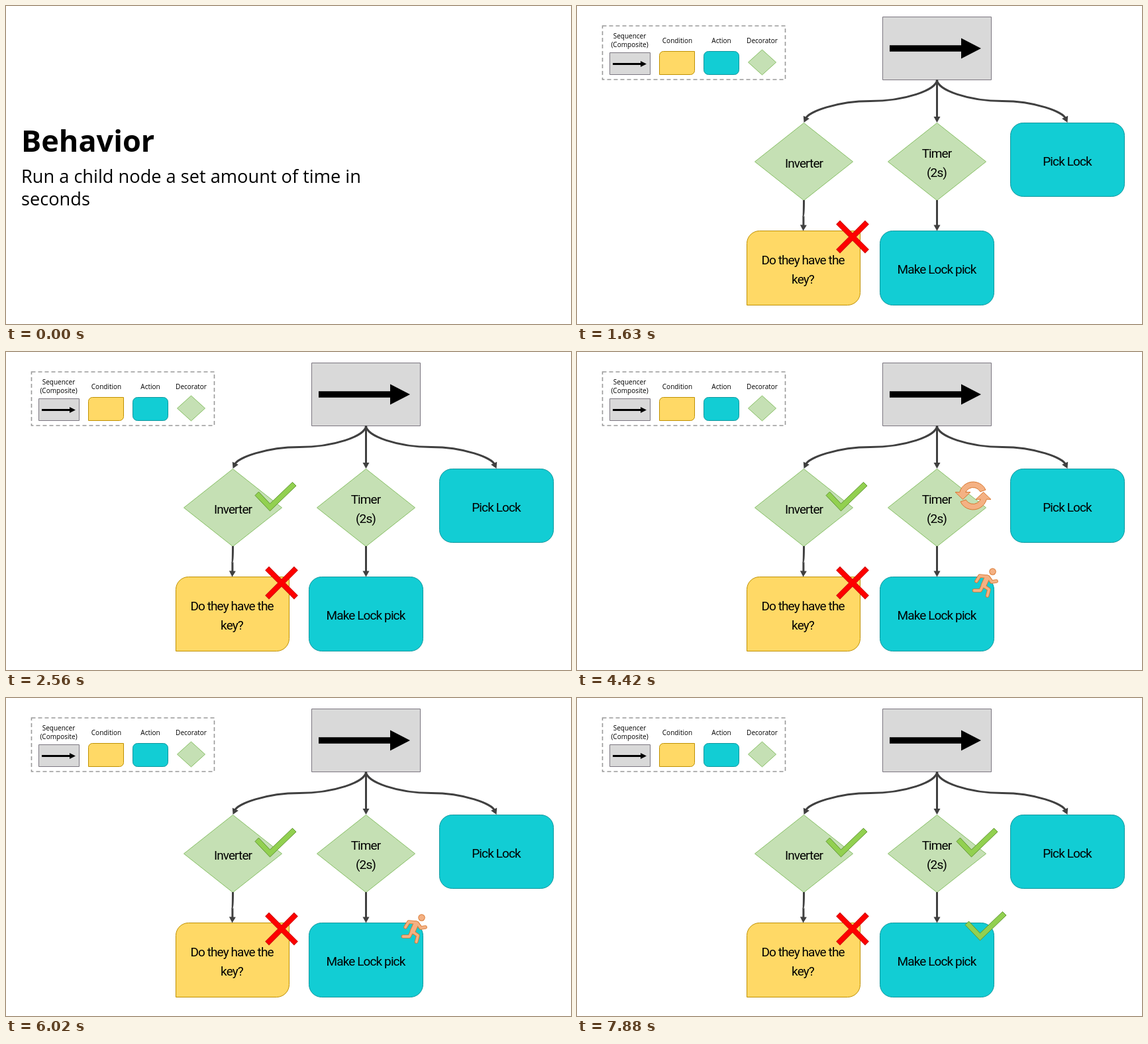
An HTML page with a canvas that plays this animation: 853 by 480 pixels, repeating every 8000 ms.

```html
<!DOCTYPE html>
<html lang="en">
<head>
<meta charset="utf-8">
<title>Timer decorator</title>
<style>
html, body { margin: 0; width: 100%; height: 100%; overflow: hidden; background: #fff; }
canvas { display: block; }
</style>
</head>
<body>
<canvas id="stage" width="853" height="480"></canvas>
<script>
const ctx = document.getElementById('stage').getContext('2d');
const LOOP = 8000;
const SANS = '"Open Sans", "Noto Sans", sans-serif';
const INK = '#404040';
const GREY = ['#d9d9d9', '#7b7680'];
const GOLD = ['#ffd966', '#bf9000'];
const TEAL = ['#12cdd4', '#0e979d'];
const LEAF = ['#c5e0b4', '#86bf63'];
const PEACH = ['#f4b183', '#d9772f'];

function paint([fill, line], width = 1) {
  ctx.fillStyle = fill;
  ctx.fill();
  ctx.strokeStyle = line;
  ctx.lineWidth = width;
  ctx.stroke();
}

function poly(points) {
  ctx.beginPath();
  points.forEach(([x, y]) => ctx.lineTo(x, y));
  ctx.closePath();
}

function box(x, y, w, h, radii, colors) {
  ctx.beginPath();
  ctx.roundRect(x, y, w, h, radii);
  paint(colors);
}

function diamond(x, y, rx, ry) {
  poly([[x, y - ry], [x + rx, y], [x, y + ry], [x - rx, y]]);
  paint(LEAF);
}

function text(str, x, y, font, align = 'center', spacing = '0px') {
  ctx.font = font;
  ctx.letterSpacing = spacing;
  ctx.textAlign = align;
  ctx.fillStyle = '#000';
  ctx.fillText(str, x, y);
}

const label = (str, x, y) => text(str, x, y, '19px Roboto, sans-serif', 'center', '-0.9px');
const caption = (str, x, y) => text(str, x, y, '10px ' + SANS);

function blockArrow(x, y, neck, tip, half, headHalf) {
  poly([[x, y - half], [neck, y - half], [neck, y - headHalf], [tip, y],
        [neck, y + headHalf], [neck, y + half], [x, y + half]]);
  ctx.fillStyle = '#000';
  ctx.fill();
}

function arrowHead(x, y, angle) {
  ctx.save();
  ctx.translate(x, y);
  ctx.rotate(angle);
  poly([[0, 0], [-5, -9], [5, -9]]);
  ctx.fillStyle = INK;
  ctx.fill();
  ctx.restore();
}

// S-shaped connector that leaves and arrives vertically
function connector(x0, y0, x1, y1, tilt) {
  const dx = x1 - x0, dy = y1 - y0, my = y0 + dy / 2;
  const ex = x1 + Math.sin(tilt) * 7, ey = y1 - Math.cos(tilt) * 7;
  ctx.beginPath();
  ctx.moveTo(x0, y0);
  ctx.bezierCurveTo(x0, y0 + dy / 4, x0 + dx / 4, my, x0 + dx / 2, my);
  ctx.bezierCurveTo(x0 + dx * 0.75, my, ex + (ex - x1) * 1.2, y1 - dy / 4, ex, ey);
  ctx.strokeStyle = INK;
  ctx.lineWidth = 3;
  ctx.stroke();
  arrowHead(x1, y1, tilt);
}

function legend() {
  ctx.setLineDash([6, 4]);
  ctx.strokeStyle = '#999';
  ctx.lineWidth = 1.6;
  ctx.strokeRect(38.5, 30, 276, 81);
  ctx.setLineDash([]);
  caption('Sequencer', 79.5, 49);
  caption('(Composite)', 79.5, 62);
  caption('Condition', 151.5, 56);
  caption('Action', 218, 56);
  caption('Decorator', 279.5, 56);
  box(49.5, 70.5, 61, 33, 0, GREY);
  blockArrow(54, 87.5, 96, 105, 1.5, 4.5);
  box(124.5, 68.5, 53, 35, [6, 0, 6, 0], GOLD);
  box(191.5, 68.5, 53, 35, 7, TEAL);
  diamond(279.5, 85, 21, 19);
}

function tree() {
  box(461.5, 16.5, 164, 95, 0, GREY);
  blockArrow(472, 64, 580, 610, 4.75, 15.5);

  diamond(342.5, 235, 74, 58.5);
  diamond(543.5, 235, 74, 58.5);
  box(654.5, 176.5, 172, 111, 19, TEAL);
  box(256.5, 339.5, 171, 112, [19, 0, 19, 0], GOLD);
  box(457.5, 339.5, 172, 112, 19, TEAL);

  connector(543.5, 111, 342.5, 176, 0.44);
  connector(543.5, 111, 740.5, 176, -0.44);
  connector(543.5, 111, 543.5, 176, 0);
  connector(342.5, 293, 341.5, 339.5, 0.04);
  connector(543.5, 293, 543.5, 339.5, 0);

  label('Inverter', 342.5, 244);
  label('Timer', 543, 229);
  label('(2s)', 543, 258);
  label('Pick Lock', 740, 241);
  label('Do they have the', 341, 390);
  label('key?', 341, 419);
  label('Make Lock pick', 543, 404);
}

function check(x, y) {
  poly([[0, 20.5], [5.5, 15], [22.5, 33], [56.5, 0.5], [62, 6], [22.5, 44]]
    .map(([px, py]) => [x + px, y + py]));
  paint(['#92d050', '#5f9632']);
}

function cross(x, y) {
  const a = 30.5, b = 3.7;
  ctx.save();
  ctx.translate(x, y);
  ctx.rotate(Math.PI / 4);
  poly([[-b, -a], [b, -a], [b, -b], [a, -b], [a, b], [b, b],
        [b, a], [-b, a], [-b, b], [-a, b], [-a, -b], [-b, -b]]);
  paint(['#ff0000', '#d01010']);
  ctx.restore();
}

function cycle(x, y) {
  for (const turn of [0, Math.PI]) {
    ctx.save();
    ctx.translate(x, y);
    ctx.rotate(turn);
    ctx.beginPath();
    ctx.arc(0, 0, 21, Math.PI * 1.08, Math.PI * 1.86);
    ctx.lineTo(10.5, -6);
    ctx.arc(0, 0, 12.5, Math.PI * 1.83, Math.PI * 1.14, true);
    ctx.lineTo(-4, -5.5);
    ctx.lineTo(-15.5, 5.5);
    ctx.lineTo(-27, -5.5);
    ctx.closePath();
    paint(PEACH);
    ctx.restore();
  }
}

const limbs = [
  [[619, 339], [608, 338], [603, 346]],
  [[621, 340], [626, 347], [633, 346]],
  [[614, 353], [622, 358.5], [619.5, 368]],
  [[613, 352], [609, 360], [599.5, 360]]
];

function runner() {
  ctx.lineCap = ctx.lineJoin = 'round';
  const [fill, line] = PEACH;
  for (const [color, grow] of [[line, 1.8], [fill, 0]]) {
    ctx.strokeStyle = ctx.fillStyle = color;
    const trace = (points, width) => {
      ctx.beginPath();
      points.forEach(p => ctx.lineTo(...p));
      ctx.lineWidth = width + grow;
      ctx.stroke();
    };
    limbs.forEach(points => trace(points, 3.8));
    trace([[619, 341], [614, 352]], 7);
    ctx.beginPath();
    ctx.arc(627.5, 331.5, 4.3 + grow / 2, 0, Math.PI * 2);
    ctx.fill();
  }
  ctx.lineCap = 'butt';
  ctx.lineJoin = 'miter';
}

function intro() {
  text('Behavior', 23, 219.5, '700 45px ' + SANS, 'left');
  text('Run a child node a set amount of time in', 23, 267, '27.2px ' + SANS, 'left');
  text('seconds', 23, 301, '27.2px ' + SANS, 'left');
}

// Overlay marks with the time span in which each is visible
const marks = [
  [1630, LOOP, () => cross(416, 348.5)],
  [2560, LOOP, () => check(376, 196)],
  [3490, 6950, runner],
  [4420, 6020, () => cycle(598, 217)],
  [6950, LOOP, () => check(586, 322)],
  [7880, LOOP, () => check(573, 196)]
];

function draw(t) {
  ctx.fillStyle = '#fff';
  ctx.fillRect(0, 0, 853, 480);
  if (t < 500) return intro();
  legend();
  tree();
  for (const [from, to, show] of marks) if (t >= from && t < to) show();
}

let start;
function tick(now) {
  start ??= now;
  draw((now - start) % LOOP);
  requestAnimationFrame(tick);
}
draw(0);
requestAnimationFrame(tick);
</script>
</body>
</html>
```
